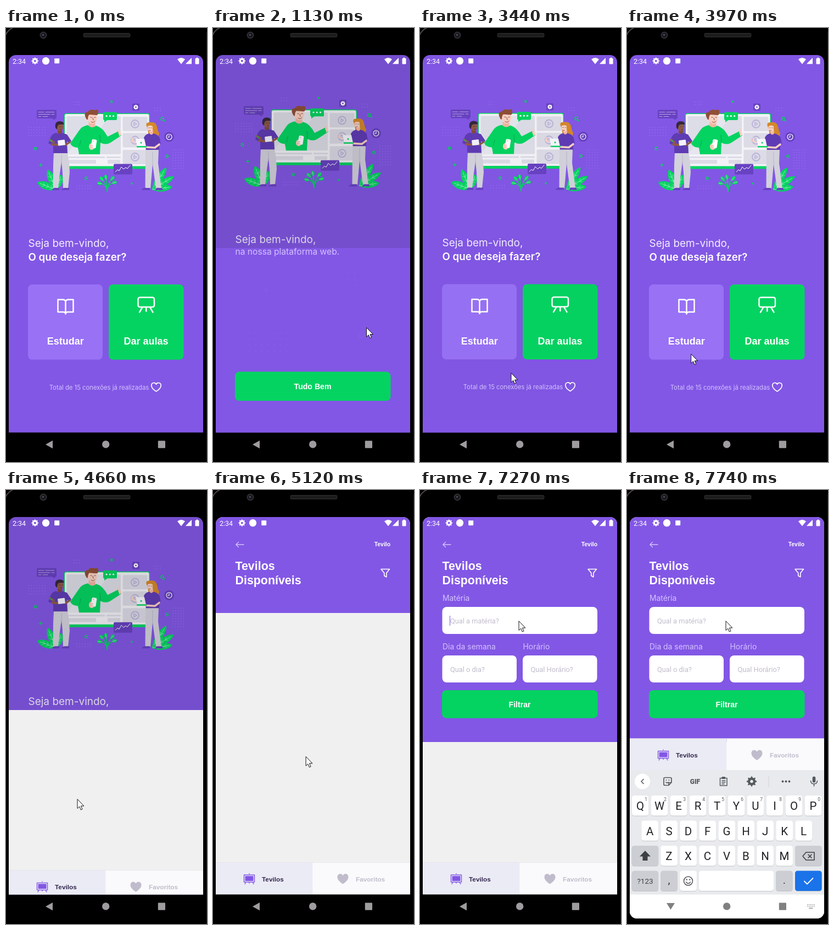
Write an HTML page with a canvas that moves like this. It is 366 by 787 pixels and loops after 8000 ms.

```html
<!DOCTYPE html>
<html lang="pt-BR">
<head>
<meta charset="utf-8">
<title>Aulas</title>
<style>
html, body { margin: 0; width: 100%; height: 100%; overflow: hidden; background: #000; }
canvas { display: block; width: 366px; height: 787px; }
</style>
</head>
<body>
<canvas id="stage"></canvas>
<script>
const LOOP = 8000, STEP = 76.8, FIRST = 290;
const TOP = 49, H = 684.6;
const PURPLE = '#8257e5', LILAC = '#9871f5', PALE = '#d4c2ff', GREEN = '#04d361';
const DARK = '#6842c2', SHIRT = '#5f3cb4', PANTS = '#d3d1dc', SKIN = '#fad0c2', WHITE = '#fff';
const POP = 'Inter, sans-serif', ARCH = '"Liberation Sans", Arial, sans-serif', ROB = 'Roboto, sans-serif';

const canvas = document.getElementById('stage');
const dpr = window.devicePixelRatio || 1;
canvas.width = 366 * dpr;
canvas.height = 787 * dpr;
const c = canvas.getContext('2d');

// ---- helpers ----
const clamp = v => Math.max(0, Math.min(1, v));

function rect(x, y, w, h, color, r = 0) {
  c.fillStyle = color;
  c.beginPath();
  c.roundRect(x, y, w, h, r);
  c.fill();
}
function disc(x, y, r, color, ry = r) {
  c.fillStyle = color;
  c.beginPath();
  c.ellipse(x, y, r, ry, 0, 0, 7);
  c.fill();
}
function ring(x, y, r, color, w = 1.5) {
  c.strokeStyle = color;
  c.lineWidth = w;
  c.beginPath();
  c.arc(x, y, r, 0, 7);
  c.stroke();
}
function shape(d, color) {
  c.fillStyle = color;
  c.fill(new Path2D(d));
}
function line(d, color, w = 1.5) {
  c.strokeStyle = color;
  c.lineWidth = w;
  c.lineCap = c.lineJoin = 'round';
  c.stroke(new Path2D(d));
}
function text(s, x, y, font, color, align = 'left') {
  c.font = font;
  c.fillStyle = color;
  c.textAlign = align;
  c.fillText(s, x, y);
}
function dots(x, y, cols, rows, gap, color, r = 1.5) {
  for (let i = 0; i < cols; i++)
    for (let j = 0; j < rows; j++) disc(x + i * gap, y + j * gap, r, color);
}
function gear(x, y, r, color) {
  ring(x, y, r * .62, color, r * .55);
  for (let a = 0; a < 8; a++) {
    const s = Math.sin(a * Math.PI / 4), k = Math.cos(a * Math.PI / 4);
    line(`M${x + k * r * .75} ${y + s * r * .75}L${x + k * r} ${y + s * r}`, color, r * .32);
  }
}
function at(x, y, draw, angle = 0) {
  c.save();
  c.translate(x, y);
  c.rotate(angle);
  draw();
  c.restore();
}
function leaf(x, y, tx, ty, w) {
  const l = Math.hypot(tx - x, ty - y);
  at(x, y, () => {
    shape(`M0 0C${l * .3} ${-w} ${l * .8} ${-w} ${l} 0C${l * .8} ${w} ${l * .3} ${w} 0 0Z`, GREEN);
    line(`M1 0H${l * .85}`, '#a5efc4', .8);
    if (w > 6)
      for (let i = 1; i < 4; i++) {
        const k = l * i * .2;
        line(`M${k + 4} ${-w * .4}L${k} 0L${k + 4} ${w * .4}`, '#a5efc4', .6);
      }
  }, Math.atan2(ty - y, tx - x));
}
// Cubic bezier easing (.35, .45, 0, 1), solved by bisection.
function ease(x) {
  x = clamp(x);
  let lo = 0, hi = 1, s = .5;
  for (let i = 0; i < 20; i++) {
    s = (lo + hi) / 2;
    if (1.05 * (1 - s) ** 2 * s + s ** 3 < x) lo = s; else hi = s;
  }
  return x === 1 ? 1 : x && 1.35 * (1 - s) ** 2 * s + 3 * (1 - s) * s * s + s ** 3;
}

// ---- illustration ----
function monitor() {
  rect(105.7, 154.5, 156.3, 101, GREEN, 4);
  rect(107, 156, 153.5, 94.5, '#f3f2f7', 3);
  rect(110.5, 160, 98.5, 69, '#dddde7', 2);
  shape('M110.5 229L165 160H190L132 229Z', '#e6e6ee');
  rect(110, 233, 70, 3, '#dcdbe6', 1);
  rect(110, 239, 54, 7, '#dcdbe6', 1);
  rect(183, 233, 26, 3, '#dcdbe6', 1);
  rect(185, 239, 23, 7, '#dcdbe6', 1);
  for (const y of [174, 203.5, 234]) {
    rect(212.5, y - 13, 45, 26, '#dcdbe6', 2);
    ring(235, y, 7, '#b9b1d8', 1.8);
    line(`M233 ${y - 3}L238 ${y}L233 ${y + 3}Z`, '#b9b1d8', 1.4);
  }
}
function teacher() {
  rect(150.5, 168, 12, 13, '#f3b5a3', 4);
  shape('M149 176Q138 178 133 186L117 209Q119 216 131 217L133 229H171L172 208Q182 213 190 208L210 195L205 187L185 197Q176 180 164 177Q157 184 149 176Z', GREEN);
  line('M136 204L133 217M171 194L172 207', '#03a94e', 1);
  disc(157.5, 163, 8.5, SKIN, 11);
  disc(148.5, 165, 2.2, SKIN, 3);
  shape('M147 166Q139 153 149 152Q154 146 161 149Q169 146 168 153Q168 158 165 158L152 157Q149 159 149 166Z', '#8f4f37');
  line('M154 162H156M161 162H163M158 163L159 167M155 170Q159 173 162 169', '#6c3d35', .9);
  shape('M204 189L206 180L208 188L210 193L207 197Z', SKIN);
  shape('M131 215L149 210L156 207L158 214L149 218L131 219Z', GREEN);
  disc(156, 215, 5, SKIN, 6);
  at(160, 210, () => {
    rect(-4.5, -8, 9, 16, WHITE, 2);
    disc(-1.5, -5, 1.1, '#c9c7d6');
  }, .15);
  line('M154 213H158M154 216H158', '#f0b09e', 1.4);
}
function student() {
  shape('M87 225H112L115 245L116 262L113 291H104L103 262L101 242L98 264L95 291H85.5L86 248Z', PANTS);
  line('M101 230V248', '#bab6ca', 1);
  shape('M84 294Q86 289 92 290H97V294Z', DARK);
  shape('M101 294Q104 289 109 290H115V294Z', DARK);
  rect(94, 183, 8, 9, '#7f4b3b', 3);
  shape('M91 190Q82 192 80 202L77 209L86 214V227H112L111 206L116 209L119 205L111 193L102 190Q97 194 91 190Z', SHIRT);
  line('M80 203L87 207M84 211L94 212', '#8f5a45', 4);
  line('M116 207L108 212', '#8f5a45', 3.5);
  disc(98, 179, 6, '#8f5a45', 8);
  shape('M90 181Q88 170 97 169Q106 169 105 175L98 175Q93 175 93 184Z', '#34283c');
  line('M97 179H99M102 179H103M99 184H102', '#45283a', .8);
  at(101, 208, () => rect(-6.5, -5, 13, 10, '#f4f3fa', 1.5), -.12);
  line('M80 203L84 206', '#20b870', 1.6);
}
function tutor() {
  shape('M254 219H278L277 245L283 291H273L267 247L263 291H253.5Z', PANTS);
  line('M267 225V248', '#bab6ca', 1);
  shape('M247 294Q250 289 256 290H262V294Z', DARK);
  shape('M272 294Q273 289 278 290H284L286 294Z', DARK);
  shape('M257 180Q252 171 262 171Q273 169 275 179Q276 186 279 191Q277 201 270 198L260 194Z', '#d4882a');
  rect(261, 185, 7, 9, '#f3b5a3', 3);
  shape('M261 191Q253 193 251 199L255 221H279V207L282 212L280 200Q277 193 268 191Q265 196 261 191Z', SHIRT);
  disc(263, 181, 5.5, SKIN, 7.5);
  shape('M256 179Q258 172 264 172Q272 173 273 181L270 192Q266 184 267 178Q262 175 256 179Z', '#d4882a');
  line('M260 181H261M264 181H265M260 186H263', '#6c3d35', .8);
  line('M279 211L271 217L254 216', SKIN, 3.5);
  line('M235 207L229 205L230 200', SKIN, 2.5);
  shape('M236 201H252L255 215H239Z', '#f6f5fb');
  shape('M238 214H256V216.5H238Z', GREEN);
  disc(246, 208, 1.5, GREEN);
}
function illustration() {
  dots(41, 180, 7, 4, 5, LILAC, .8);
  dots(124, 134, 3, 2, 5, LILAC, .8);
  dots(271, 145, 3, 2, 5, LILAC, .8);
  dots(304, 221, 5, 8, 4.8, LILAC, .8);
  dots(129, 286, 6, 2, 5, LILAC, .8);
  monitor();
  teacher();

  rect(177, 152.5, 25, 14.5, GREEN, 2);
  shape('M179 166H186L179 171Z', GREEN);
  for (let i = 0; i < 3; i++) disc(183 + i * 6.3, 159.7, 1.6, WHITE);
  rect(56, 148.5, 36, 15.5, DARK, 2);
  shape('M83 163H91L88 167Z', DARK);
  line('M59 152.5H69M72 152.5H88M59 156.5H80M83 156.5H88M59 160.5H64M67 160.5H76', '#b9a6e8', 1);
  rect(230, 137, 13, 13, DARK, 2);
  gear(236.5, 143.5, 4, WHITE);
  disc(297, 197.5, 9, DARK);
  ring(297, 197.5, 5, WHITE, 1.2);
  line('M297 194.5V198H294.5', WHITE, 1.1);
  ring(284.5, 164.5, 2.6, GREEN);
  line('M286.7 166.7L289 169', GREEN, 1.7);

  for (const [x, y] of [[76, 257], [57, 280], [101, 266]]) leaf(91, 293, x, y, 9);
  for (const [x, y] of [[292, 253], [306, 269], [303, 288]]) leaf(266, 293, x, y, 8);
  for (const [x, y] of [[181, 266], [171, 270], [197, 269], [166, 281], [202, 279]]) {
    const mx = (184 + x) / 2, my = (284 + y) / 2;
    line(`M184 296Q184 286 ${mx} ${my}`, GREEN, 1.5);
    leaf(mx, my, x, y, 4.5);
  }
  student();
  tutor();

  rect(196, 246.5, 34, 19, DARK, 2);
  line('M199 261L203 257L206 259L210 252L214 256L218 253L221 255L226 249', WHITE, 1);
  line('M190.5 132L194 135M194 132L190.5 135M61 248.5H66M63.5 246V251M228 281L230 283M230 281L228 283', GREEN, 1.5);
  ring(53.5, 218.5, 2.2, GREEN);
  ring(146, 272.5, 2.2, GREEN);
  ring(293, 232.5, 2.2, GREEN);
}

// ---- screens ----
function home(q) {
  rect(5, TOP - 20, 354, H + 60, PURPLE);
  illustration();
  text('Seja bem-vindo,', 40.5, 396.5, `19px ${POP}`, '#f3eeff');
  text('O que deseja fazer?', 40.5, 421.5, `600 18.7px ${POP}`, WHITE);
  rect(40, 465, 136, 136.5, LILAC, 8);
  rect(187, 465, 136.5, 136.5, GREEN, 8);
  if (q > 970 && q < 1400) rect(187, 465, 136.5, 136.5, 'rgba(0,0,0,.06)', 8);
  if (q > 4430 && q < 4900) rect(40, 465, 136, 136.5, 'rgba(0,0,0,.06)', 8);
  line('M108.5 497Q108.5 492.5 103 492.5H94.5V515H104Q108.5 515 108.5 518.5Q108.5 515 113 515H122.5V492.5H114Q108.5 492.5 108.5 497V518', WHITE, 2.5);
  line('M244.5 488.5H266Q270 488.5 270 492V502.5Q270 506 266 506H244.5Q240.5 506 240.5 502.5V492Q240.5 488.5 244.5 488.5ZM248 507L243 515.5M262.5 507L267.5 515.5M255.3 507V513.5', WHITE, 2.5);
  text('Estudar', 108.3, 574, `bold 18px ${ARCH}`, WHITE, 'center');
  text('Dar aulas', 255, 574, `bold 18px ${ARCH}`, WHITE, 'center');
  text('Total de 15 conexões já realizadas', 78.7, 655.5, `11.3px ${POP}`, PALE);
  line('M273.5 659C267 655 264.8 651.5 264.8 648.2C264.8 643 271.5 641.6 273.5 646.2C275.5 641.6 282.2 643 282.2 648.2C282.2 651.5 280 655 273.5 659Z', WHITE, 1.7);
}
function pattern() {
  dots(84.5, 86.5, 6, 3, 11.2, LILAC);
  dots(283, 212.5, 2, 3, 11.2, LILAC);
  dots(247, 430.5, 2, 3, 11.2, LILAC);
  dots(66.5, 538.5, 7, 4, 11.2, LILAC);
  ring(251.5, 103.5, 4.6, LILAC, 1.8);
  ring(293.5, 363.5, 4.6, LILAC, 1.8);
  ring(271, 542, 4.8, LILAC, 1.8);
  line('M267.5 545.5L263.5 549.5M184 182.5H192M188 178.5V186.5M92.5 460H100.5M96.5 456V464', LILAC, 1.8);
}
function give(q) {
  rect(5, TOP - 20, 354, H + 60, PURPLE);
  // The backdrop fades in once the screen is mounted.
  c.globalAlpha = clamp((q - 1090) / 300);
  pattern();
  c.globalAlpha = 1;
  text('Quer ser', 40.5, 278, `bold 28.6px ${ARCH}`, WHITE);
  text('um Tevilo?', 40.5, 309, `bold 28.6px ${ARCH}`, WHITE);
  const font = `15.6px ${POP}`;
  text('Para começar, você precisa', 40.5, 353, font, PALE);
  text('se cadastrar com professor', 40.5, 373, font, PALE);
  text('na nossa plataforma web.', 40.5, 397, font, PALE);
  rect(40, 609, 283.5, 52.7, GREEN, 8);
  text('Tudo Bem', 181.5, 641, `bold 14.1px ${ARCH}`, WHITE, 'center');
}
function tabs(y) {
  rect(5, y, 176.5, 59, '#ebebf5');
  rect(181.5, y, 178, 59, '#fafafc');
  rect(5, y, 354, .7, '#e3e3ea');
  at(0, y - 675, () => {
    line('M56.5 698H75.5V711H56.5Z', PURPLE, 1.4);
    rect(58.5, 700, 15, 9, PURPLE);
    line('M66 695.5V696M59.5 712L58 714.5M72.5 712L74 714.5M66 712V713', PURPLE, 1.4);
    shape('M236.5 714.5C229 709.5 226.5 705.5 226.5 702C226.5 695.5 234 694 236.5 699.2C239 694 246.5 695.5 246.5 702C246.5 705.5 244 709.5 236.5 714.5Z', '#c1bccc');
    text('Tevilos', 89, 709.5, `bold 11.8px ${ARCH}`, '#32264d');
    text('Favoritos', 260, 709.5, `bold 11.8px ${ARCH}`, '#c1bccc');
  });
}
function field(x, y, w, label, hint) {
  text(label, x, y - 11, `13.9px ${POP}`, PALE);
  rect(x - .5, y, w, 49, WHITE, 8);
  text(hint, x + 14, y + 29.5, `12.8px ${ROB}`, '#c1bccc');
}
function list(q) {
  const open = q > 6420;
  rect(5, TOP, 354, H + 40, '#f0f0f1');
  rect(5, TOP - 20, 354, (open ? 457 : 223) - TOP + 20, PURPLE);
  line('M56 99H42M46.5 94.5L41.8 99L46.5 103.5', PALE, 1.3);
  text('Tevilo', 323, 102, `bold 10.4px ${ARCH}`, WHITE, 'right');
  text('Tevilos', 40.5, 145, `bold 21.4px ${ARCH}`, WHITE);
  text('Disponíveis', 40.5, 171, `bold 21.4px ${ARCH}`, WHITE);
  if (q > 6100 && q < 6500) disc(314, 150.5, 11, 'rgba(0,0,0,.07)');
  line('M306 143.5H321.5L315.8 150.5V157.8L311.8 155.5V150.5Z', WHITE, 1.6);
  if (open) {
    field(41, 212, 282.5, 'Matéria', 'Qual a matéria?');
    field(41, 300, 135.5, 'Dia da semana', 'Qual o dia?');
    field(187.5, 300, 135.5, 'Horário', 'Qual Horário?');
    rect(40, 363, 283.5, 50.7, GREEN, 8);
    text('Filtrar', 181.5, 394, `bold 14.1px ${ARCH}`, WHITE, 'center');
    if (q > 7270 && q < 7700) rect(54, 228, 1, 18, PURPLE);
  }
  tabs(q > 7500 ? 450.5 : 675);
}

// ---- keyboard ----
const INK = '#202124', GRAY = '#55595e';
function key(x, y, w, color = WHITE) {
  rect(x, y + 1, w, 36.5, '#c3c6cb', 4.5);
  rect(x, y, w, 36.5, color, 4.5);
}
function row(letters, x, y, digits) {
  [...letters].forEach((s, i) => {
    const kx = x + i * 35;
    key(kx, y, 30.7);
    text(s, kx + 15.3, y + 26, `20.5px ${ROB}`, INK, 'center');
    if (digits) text((i + 1) % 10, kx + 26, y + 10, `8.5px ${ROB}`, GRAY, 'center');
  });
}
function keyboard() {
  rect(5, 508, 354, 226, '#e8eaed');
  rect(5, 733.5, 354, 44, WHITE);
  disc(28, 528.5, 14, WHITE);
  line('M30 524.5L26 528.5L30 532.5', GRAY, 1.7);
  line('M69 521.5H79Q81 521.5 81 523.5V530L76 535.5H69Q67 535.5 67 533.5V523.5Q67 521.5 69 521.5ZM76 535V530.5H81M71 530Q73 532 75 530', GRAY, 1.7);
  disc(71.5, 526, 1, GRAY);
  disc(76.5, 526, 1, GRAY);
  text('GIF', 124, 532.5, `900 12px ${ROB}`, GRAY, 'center');
  line('M169.5 522.5H182V536H169.5ZM173 527H179M173 530H179M173 533H177', GRAY, 1.5);
  rect(172.5, 520, 6.5, 4, GRAY, 1);
  gear(227, 528.5, 8, GRAY);
  rect(257.5, 519, 1, 20, '#cfd2d6');
  for (let i = -1; i < 2; i++) disc(289.5 + i * 6, 528.5, 1.9, GRAY);
  rect(337.7, 519.5, 5.6, 11, GRAY, 2.8);
  line('M334.5 527.5Q335 533 340.5 533Q346 533 346.5 527.5M340.5 533V537', GRAY, 1.6);

  row('QWERTYUIOP', 8.7, 554, true);
  row('ASDFGHJKL', 26.3, 599.5);
  row('ZXCVBNM', 61.2, 645);
  const mute = '#ccced4';
  key(8.7, 645, 48.5, mute);
  shape('M33 654L43 664.5H37.5V672H28.5V664.5H23Z', '#3c4043');
  key(306, 645, 48.7, mute);
  line('M326 657H341V671H326L320 664ZM330 661L336 667M336 661L330 667', '#3c4043', 1.6);
  key(8.7, 690.5, 48.5, mute);
  text('?123', 33, 714, `13.5px ${ROB}`, '#3c4043', 'center');
  key(61.2, 690.5, 30.7, mute);
  text(',', 76.5, 714, `18px ${ROB}`, INK, 'center');
  key(96.2, 690.5, 30.7);
  ring(111.5, 709, 8, GRAY, 1.6);
  disc(108.7, 706.5, 1.2, GRAY);
  disc(114.3, 706.5, 1.2, GRAY);
  line('M107.5 711Q111.5 716 115.5 711', GRAY, 1.6);
  key(131, 690.5, 136);
  key(271, 690.5, 30.7, mute);
  text('.', 286.3, 714, `18px ${ROB}`, INK, 'center');
  key(306, 690.5, 48.7, '#1a73e8');
  line('M323 709.5L328 714.5L338.5 704', WHITE, 1.8);
}

// ---- device ----
function device() {
  rect(0, 0, 366, 787, '#000');
  line('M-1 13Q3 4 13 -1', '#51474f', 2);
  rect(365, 8, 1, 779, '#1b1b1d');
  disc(68, 13, 6.5, '#2f2f34');
  disc(68, 13, 4.3, '#131318');
  disc(67.5, 12.5, 2, '#454258');
  rect(140.5, 9, 86, 8, '#262626', 3);
  rect(142, 11, 83, 4, '#1b1b1b', 2);
}
function statusBar() {
  text('2:34', 12, 64.5, `12.5px ${ROB}`, WHITE);
  gear(52.8, 59.7, 5.6, WHITE);
  disc(72.5, 59.7, 6.7, WHITE);
  rect(88.2, 55.2, 9, 9, WHITE, 1);
  shape('M312 56.8Q319 51.2 326 56.8L319 65.5Z', WHITE);
  shape('M338 54V65.3H326.8Z', WHITE);
  rect(344.5, 55, 7, 10.5, WHITE, 1);
  rect(346.5, 53.7, 3, 2, WHITE);
}
function navBar(light) {
  const color = light ? '#808080' : '#9f9c9f';
  shape(light ? 'M72 749H87L79.5 761Z' : 'M85 748V762.5L72 755.2Z', color);
  disc(181.7, 755, 6.7, color);
  rect(276.8, 748.5, 13.2, 13.2, color, 1);
  if (light) {
    for (let i = 0; i < 5; i++)
      for (let j = 0; j < 2; j++) rect(328 + i * 3, 751 + j * 3, 1.6, 1.6, '#9a9a9a');
    rect(331, 757.5, 7.5, 1.6, '#9a9a9a');
  }
}

// Pointer path: time, x, y
const PATH = [
  [290, 305, 714], [600, 313, 640], [820, 296, 562], [1060, 279.5, 543.5], [1300, 279.5, 543.5],
  [1900, 179, 232], [2130, 163, 193], [2290, 140, 281], [2450, 95, 320], [2600, 112, 480],
  [2750, 150, 589], [2830, 151, 592], [3060, 166, 626], [3500, 166, 626], [3970, 116.5, 592],
  [4300, 128, 566], [4660, 130, 561], [5000, 130, 561], [5660, 331, 164], [5970, 317, 152],
  [6430, 317, 152], [6890, 184, 254], [7040, 180, 238]
];
function pointer(q) {
  if (q < FIRST) return;
  const i = PATH.findIndex(p => p[0] > q);
  const b = PATH[i < 0 ? PATH.length - 1 : i], a = i < 0 ? b : PATH[i - 1];
  const f = a === b ? 0 : (q - a[0]) / (b[0] - a[0]);
  at(a[1] + (b[1] - a[1]) * f, a[2] + (b[2] - a[2]) * f, () => {
    const arrow = 'M0 0V16.5L3.8 13L6.3 19L9 17.8L6.5 12H11.5Z';
    shape(arrow, WHITE);
    line(arrow, '#111', 1);
  });
}

function draw(q) {
  c.setTransform(dpr, 0, 0, dpr, 0, 0);
  device();
  const giveP = q < 1100 ? 0 : q < 3200 ? ease((q - 1049.8) / 425) : 1 - ease((q - 3170) / 425);
  const listP = ease((q - 4582.6) / 425);
  const p = Math.max(giveP, listP);

  c.save();
  c.beginPath();
  c.roundRect(5, TOP, 354, H, [13, 13, 0, 0]);
  c.clip();
  if (p < 1) {
    at(0, -.02 * H * p, () => home(q));
    rect(5, TOP, 354, H, `rgba(0,0,0,${.1 * clamp(p / .36)})`);
  }
  if (p > 0) {
    c.beginPath();
    c.rect(5, TOP + H * (1 - p), 354, H);
    c.clip();
    at(0, .041 * H * (1 - p), () => listP > 0 ? list(q) : give(q));
  }
  c.restore();
  statusBar();

  const rise = 1 - (1 - clamp((q - 7290) / 300)) ** 3;
  if (rise > 0) {
    c.save();
    c.beginPath();
    c.roundRect(5, TOP, 354, 728, 13);
    c.clip();
    rect(5, 733.5, 354, 44, WHITE);
    at(0, 269 * (1 - rise), keyboard);
    c.restore();
  }
  navBar(rise > 0);
  pointer(q);
}

const start = performance.now();
function tick() {
  const t = (performance.now() - start) % LOOP;
  const k = Math.floor((t - FIRST + 10) / STEP);
  draw(k < 0 ? 0 : FIRST + STEP * k);
  requestAnimationFrame(tick);
}
tick();
</script>
</body>
</html>
```
